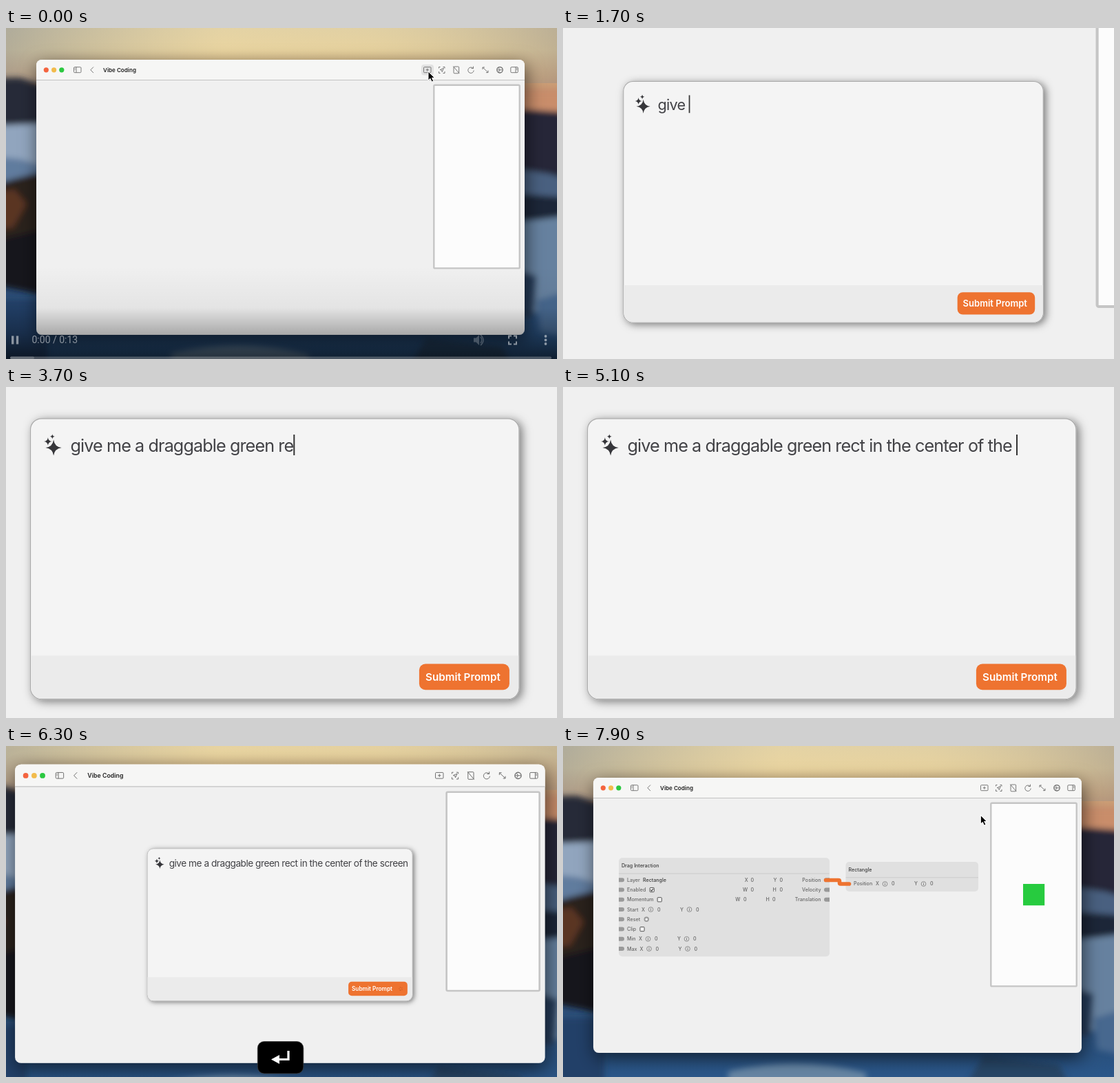
Animation of 800x480 px, one loop 8 s. Source, as an HTML page:

```html
<!DOCTYPE html>
<html lang="en">
<head>
<meta charset="utf-8">
<title>Prompt to nodes</title>
<style>
  html, body { margin: 0; width: 100%; height: 100%; overflow: hidden; background: #f0f0f0; }
  svg { display: block; width: 100vw; height: 100vh; }
  text { font-family: Inter, sans-serif; white-space: pre; }
  .icon { fill: none; stroke: #6c6c6c; stroke-width: .9; }
  .title { font-size: 8.1px; font-weight: 600; fill: #222; }
  .big { font-size: 12.6px; letter-spacing: -.45px; fill: #424246; }
  .list { font-size: 7.6px; letter-spacing: -.12px; fill: #606060; }
  .doc { font-size: 7.2px; letter-spacing: -.12px; fill: #3c3c3c; }
  .button { font-size: 7.6px; font-weight: 600; fill: #fff; }
  .node { font-size: 7.1px; font-weight: 500; fill: #666; }
  .dark { fill: #3a3a3a; }
  .end { text-anchor: end; }
</style>
</head>
<body>
<svg viewBox="0 0 800 480">
  <defs>
    <linearGradient id="sky" x2="0" y2="1">
      <stop stop-color="#d5c9a6"/><stop offset=".1" stop-color="#e2cd9b"/>
      <stop offset=".17" stop-color="#d3aa7c"/><stop offset=".25" stop-color="#b87f66"/>
      <stop offset=".3" stop-color="#39435a"/><stop offset=".9" stop-color="#29517f"/>
      <stop offset="1" stop-color="#2b5a90"/>
    </linearGradient>
    <linearGradient id="vignette">
      <stop stop-color="#7b8592" stop-opacity=".5"/><stop offset=".4" stop-color="#fbe6ac" stop-opacity=".3"/>
      <stop offset=".65" stop-color="#fbe6ac" stop-opacity=".2"/><stop offset="1" stop-color="#8c8583" stop-opacity=".45"/>
    </linearGradient>
    <linearGradient id="shade" x2="0" y2="1">
      <stop stop-opacity="0"/><stop offset=".45" stop-opacity=".05"/>
      <stop offset=".72" stop-opacity=".28"/><stop offset="1" stop-opacity=".65"/>
    </linearGradient>
    <filter id="soft" x="-20%" y="-20%" width="140%" height="140%"><feGaussianBlur stdDeviation="4"/></filter>
    <filter id="windowShadow" x="-10%" y="-10%" width="120%" height="130%">
      <feDropShadow dy="7" stdDeviation="13" flood-opacity=".6"/>
    </filter>
    <filter id="panelShadow" x="-10%" y="-10%" width="120%" height="125%">
      <feDropShadow dy="1.5" stdDeviation="3.5" flood-opacity=".5"/>
    </filter>
    <filter id="motion" filterUnits="userSpaceOnUse" x="-20" y="-20" width="840" height="520">
      <feGaussianBlur id="motionBlur" stdDeviation="0"/>
    </filter>
  </defs>

  <g id="camera">
    <rect x="-20" y="-20" width="840" height="520" fill="url(#sky)"/>
    <rect x="-20" y="-20" width="840" height="100" fill="url(#vignette)"/>
    <g filter="url(#soft)">
      <path d="M-20 73L20 72 70 88V150H-20Z" fill="#262b38"/>
      <path d="M-20 142L60 138V222H-20Z" fill="#91a5be"/>
      <path d="M-20 186L20 190 60 202V222H-20Z" fill="#607b9e"/>
      <path d="M-20 228L14 218 60 207V382L-20 372Z" fill="#2c211f"/>
      <path d="M-20 240L12 234 30 255 10 290H-20Z" fill="#5a3421"/>
      <path d="M-20 310L60 290V388L-20 372Z" fill="#12161f"/>
      <path d="M740 91H820V122L740 116Z" fill="#c98d6b"/>
      <path d="M740 118L820 123V225H740Z" fill="#252838"/>
      <path d="M740 204L790 212 820 222V250H740Z" fill="#4a6180"/>
      <path d="M740 240L820 246V278H740Z" fill="#1c2537"/>
      <path d="M740 282L820 272V400L740 420Z" fill="#66819f"/>
      <path d="M740 350L770 360 765 420H740Z" fill="#273d5c"/>
      <path d="M770 395L820 380V450L775 440Z" fill="#46678f"/>
      <path d="M-20 395H60V500H-20Z" fill="#203f68"/>
      <path d="M240 472Q340 448 440 474V500H240Z" fill="#6685a3"/>
      <path d="M610 450L720 462 740 500H580Z" fill="#274465"/>
    </g>
    <rect x="44" y="46" width="709" height="399" rx="8" fill="#f0f0f0" filter="url(#windowShadow)"/>
    <path d="M44 75.5V54a8 8 0 0 1 8-8H745a8 8 0 0 1 8 8V75.5Z" fill="#f6f6f5"/>
    <path d="M44 75.5H753" stroke="#c3c3c3"/>
    <circle cx="58.3" cy="60.8" r="3.6" fill="#f4643f"/>
    <circle cx="69.6" cy="60.8" r="3.6" fill="#f2bb4c"/>
    <circle cx="80.8" cy="60.8" r="3.6" fill="#2bc840"/>
    <text class="title" x="141" y="63.8">Vibe Coding</text>
    <rect id="hover" x="603" y="53" width="18" height="15.5" rx="4" fill="#e2e2e2"/>
    <g class="icon">
      <rect x="98.5" y="56.7" width="10.5" height="8" rx="1.3"/><path d="M102 56.7v8M99.7 58.7h1M99.7 60.3h1M127 56.5l-4.2 4.3 4.2 4.3"/>
      <rect x="606.5" y="56.7" width="10.5" height="8" rx="1"/><path d="M611.8 58.7v4M609.8 60.7h4"/>
      <path d="M628.5 58.5v-2h2M634.5 56.5h2.5v2M637 63v2.5h-2.5M630.5 65.5h-2v-2.5M635.5 58.3l-5.3 2.3 2.4 .6 .6 2.4Z"/>
      <rect x="650" y="56" width="7.6" height="9.8" rx="1"/><path d="M649.3 55.5l9 10.6"/>
      <path d="M678.3 58.6A4.2 4.2 0 1 0 679.2 61.5M675.5 58.6h3v-3"/>
      <path d="M692 60v-3h3M692 57l8 7.5M697 64.6h3v-3"/>
      <circle cx="717" cy="60.8" r="4.2" stroke-width="1.3"/><path d="M713.5 60.8h7M717 60.8l-2-3.3M717 60.8l-2 3.3"/>
      <rect x="732.8" y="56.7" width="10.5" height="8" rx="1.3"/><path d="M740 56.7v8M741 58.7h1.3M741 60.3h1.3"/>
    </g>
    <rect x="621.3" y="82.8" width="124.4" height="265.6" rx="1.5" fill="#fcfcfc" stroke="#c5c5c5" stroke-width="2.4"/>

    <g id="nodes"></g>

    <g id="panel">
      <rect x="221" y="158.4" width="354.7" height="203.4" rx="8" fill="#f4f4f4" stroke="#a9a9a9" stroke-width=".6" filter="url(#panelShadow)"/>
      <path d="M221.3 330.3H575.4V353.5a8 8 0 0 1-8 8H229.3a8 8 0 0 1-8-8Z" fill="#ebebeb"/>
      <g id="search">
        <g fill="none" stroke="#333" stroke-width="1.2"><circle cx="236.3" cy="176.7" r="4.8"/><path d="M239.8 180.2l4 4"/></g>
        <text class="big" x="250" y="182.5" style="fill:#b5b5b5">Search or enter AI prompt...</text>
        <rect x="226" y="196.5" width="90" height="14" rx="4" fill="#ee7330"/>
        <clipPath id="listClip"><rect x="221" y="190" width="355" height="140"/></clipPath>
        <g id="lists" clip-path="url(#listClip)"></g>
        <rect x="522" y="336.3" width="47" height="18.8" rx="4.5" fill="#ee7330"/>
        <text class="button" x="527" y="348.5">Add Node</text>
      </g>
      <g id="prompt">
        <path id="sparkle" fill="#36363a"/>
        <text id="typed" class="big" x="250" y="182.4"></text>
        <rect id="caret" y="170" width="1" height="15" fill="#333"/>
        <rect id="submit" y="336.3" height="18.8" rx="4.5" fill="#ee7330"/>
        <text id="submitLabel" class="button" y="348.5">Submit Prompt</text>
        <circle id="spinner" cx="560" cy="345.8" r="2" fill="none" stroke="#c65a24" stroke-width="1.2" stroke-dasharray=".8 1.3"/>
      </g>
    </g>
    <path id="cursor" d="M0 0V13L3 10.3 5.1 15 7.6 13.9 5.5 9.3H9.4Z" stroke="#fff" stroke-width="1"/>
  </g>

  <g id="keycap">
    <rect x="365.3" y="428.5" width="66.5" height="46.5" rx="9.5" stroke="#3c3c3c" stroke-width=".8"/>
    <path d="M410 442V454.5H394" fill="none" stroke="#fff" stroke-width="3.2"/>
    <path d="M385 454.5L397 448V461Z" fill="#fff"/>
  </g>

  <g id="controls">
    <rect y="345" width="800" height="135" fill="url(#shade)"/>
    <g opacity=".5" fill="#fff">
      <path d="M8 446.5h3.4v12H8ZM14.8 446.5h3.4v12h-3.4Z"/>
      <text x="37.5" y="457.3" style="font:14px Roboto,sans-serif">0:00 / 0:13</text>
      <path d="M679 449.5h3.5l4.5-4.5v15l-4.5-4.5H679Z" opacity=".45"/>
      <path d="M689 448q3.5 4.500 0 9M689 444.800q8 7.700 0 15.400" fill="none" stroke="#fff" stroke-width="1.6" opacity=".45"/>
      <path d="M730 450.500v-4h4M737 446.500h4v4M741 454.500v4h-4M734 458.500h-4v-4" fill="none" stroke="#fff" stroke-width="2"/>
      <circle cx="783.5" cy="447" r="1.9"/><circle cx="783.5" cy="452.500" r="1.9"/><circle cx="783.5" cy="458" r="1.9"/>
      <rect x="6" y="476.500" width="786" height="3.500" rx="1.700" opacity=".5"/>
      <rect x="6" y="476.500" width="35" height="3.500" rx="1.700" opacity=".5"/>
    </g>
  </g>
</svg>

<script>
const $ = id => document.getElementById(id);
const set = (id, attrs) => { for (const k in attrs) $(id).setAttribute(k, attrs[k]); };
const show = (id, amount) => {
  $(id).style.display = amount > 0 ? '' : 'none';
  $(id).style.opacity = amount;
};
const clamp = x => Math.min(1, Math.max(0, x));
const ramp = (t, from, to) => clamp((t - from) / (to - from));
const smooth = x => x * x * (3 - 2 * x);
const label = (cls, x, y, s) => `<text class="${cls}" x="${x}" y="${y}">${s}</text>`;

// Search lists
const kinds = ['Text', 'Oval', 'Rectangle', 'Image', 'Video', '3D Model', 'Reality View', 'Shape', 'Color Fill', 'Hit Area'];
const inputs = ['Text value (a string)', 'Color', 'Position (X/Y)', 'Rotation X', 'Rotation Y', 'Rotation Z',
  'Size (Width / Height)', 'Opacity', 'Scale', 'Anchoring'];
$('lists').innerHTML =
  kinds.map((s, i) => label('list', 230, 206.2 + i * 13.85, s)).join('') +
  label('doc', 323, 203.8, 'Text') +
  label('doc', 323, 221.4, 'Displays a text value in the preview window.') +
  `<g font-style="italic">${label('doc', 323, 239.4, 'Inputs')}</g>` +
  inputs.map((s, i) => label('doc', 323, 248.2 + i * 8.85, '• ' + s)).join('');

// Node graph
const row = i => 194.3 + i * 14.25;
const word = (x, y, s, cls = '') => label('node ' + cls, x, y + 2.5, s);
const inPort = (x, y) => `<path d="M${x} ${y - 3}h5a3 3 0 0 1 0 6h-5Z" fill="#999"/>`;
const outPort = y => `<path d="M387 ${y - 3}h-5a3 3 0 0 0 0 6h5Z" fill="#999"/>`;
const info = (x, y) => `<circle class="icon" cx="${x}" cy="${y}" r="3.4" style="stroke-width:.7"/>` +
  `<path d="M${x} ${y - 1.8}v.8M${x} ${y - .4}v2.2" stroke="#555" stroke-width=".8"/>`;
const box = (x, y) => `<rect x="${x - 3.1}" y="${y - 3.1}" width="6.2" height="6.2" rx=".8" fill="#f3f3f3" stroke="#444" stroke-width=".9"/>`;
const field = (x, y, name) => word(x, y, name) + info(x + 13.5, y) + word(x + 23, y, '0');
const card = (x, y, w, h, name) =>
  `<rect x="${x}" y="${y}" width="${w}" height="${h}" rx="5" fill="#e0e0e0"/>` +
  `<path d="M${x} ${y + 22.8}h${w}" stroke="#c6c6c6" stroke-width=".8"/>` + word(x + 4, y + 11.3, name, 'dark');
const pair = (i, a, ax, b, bx, n1, n2) =>
  word(ax, row(i), a) + word(n1, row(i), '0') + word(bx, row(i), b) + word(n2, row(i), '0');

$('nodes').innerHTML =
  card(81, 162.2, 306, 143, 'Drag Interaction') +
  ['Layer', 'Enabled', 'Momentum', 'Start', 'Reset', 'Clip', 'Min', 'Max']
    .map((s, i) => inPort(81, row(i)) + word(93, row(i), s)).join('') +
  ['Position', 'Velocity', 'Translation'].map((s, i) => outPort(row(i)) + word(374.5, row(i), s, 'end')).join('') +
  word(116, row(0), 'Rectangle', 'dark') +
  pair(0, 'X', 263.7, 'Y', 305.5, 272.5, 314.5) +
  pair(1, 'W', 261, 'H', 304.5, 272.5, 314.5) +
  pair(2, 'W', 250.3, 'H', 294.5, 262, 304) +
  box(129.2, row(1)) + `<path d="M127.4 ${row(1)}l1.4 1.6 2.4-3.4" fill="none" stroke="#333"/>` +
  box(140.2, row(2)) + box(115, row(5)) +
  `<circle cx="121.2" cy="${row(4)}" r="2.8" fill="#eee" stroke="#999" stroke-width="1.8"/>` +
  [[3, 114], [6, 110], [7, 111.5]].map(([i, x]) => field(x, row(i), 'X') + field(x + 56, row(i), 'Y')).join('') +
  card(410.5, 168, 192.5, 43, 'Rectangle') +
  word(422, 200, 'Position') + field(454, 200, 'X') + field(510, 200, 'Y') +
  '<path d="M381.500 194.500H400q1.500 0 1.500 1.500v2.500q0 1.500 1.500 1.500h12.500" fill="none" stroke="#ee7330" stroke-width="5.600" stroke-linecap="round"/>' +
  '<rect x="668" y="200" width="31.2" height="31.2" fill="#27cb3f"/>';

const star = (x, y, r) => `M${x} ${y - r}Q${x + r * .12} ${y - r * .12} ${x + r} ${y}Q${x + r * .12} ${y + r * .12} ${x} ${y + r}` +
  `Q${x - r * .12} ${y + r * .12} ${x - r} ${y}Q${x - r * .12} ${y - r * .12} ${x} ${y - r}Z`;
set('sparkle', { d: star(237.8, 179.5, 5.8) + star(233.7, 175, 2.9) + star(236.9, 171.4, 1.8) });

// Timeline, in ms
const LOOP = 8000, OPEN = 480, ZOOM_IN = 1350, ZOOM_OUT = 5733, ENTER = 5600, CLOSE = 7050;
const PROMPT = 'give me a draggable green rect in the center of the screen';
const typing = [[1200, 0], [2100, 10.3], [2700, 16.5], [3700, 28.3], [5450, 58]];
const OMEGA = .0072;   // critically damped camera spring

const spring = t => t < 0 ? 0 : 1 - (1 + OMEGA * t) * Math.exp(-OMEGA * t);
const speed = t => t < 0 ? 0 : 1000 * OMEGA * OMEGA * t * Math.exp(-OMEGA * t);

function typedCount(t) {
  let n = 0;
  for (let i = 1; i < typing.length; i++) {
    const [t0, n0] = typing[i - 1], [t1, n1] = typing[i];
    n += (n1 - n0) * ramp(t, t0, t1);
  }
  return Math.floor(n + 1e-6);
}

function render(t) {
  const zoom = 1 + spring(t - ZOOM_IN) - spring(t - ZOOM_OUT);
  const blur = .22 * Math.abs(speed(t - ZOOM_IN) - speed(t - ZOOM_OUT));
  set('camera', {
    transform: `translate(406.5 271) scale(${zoom}) translate(-406.5 -271)`,
    filter: blur > .08 ? 'url(#motion)' : 'none'
  });
  set('motionBlur', { stdDeviation: blur });

  show('controls', 1 - ramp(t, 60, 320));
  show('hover', t < 560 ? 1 : 0);
  show('panel', ramp(t, OPEN, OPEN + 120) * (1 - ramp(t, CLOSE, CLOSE + 100)));
  show('nodes', ramp(t, CLOSE + 50, CLOSE + 150));

  const count = typedCount(t), sent = t >= ENTER;
  show('search', count ? 0 : 1);
  show('prompt', count ? 1 : 0);
  $('typed').textContent = PROMPT.slice(0, count);
  if (count) set('caret', { x: 250 + $('typed').getComputedTextLength() });
  show('caret', sent ? 0 : 1);
  set('submit', { x: sent ? 490 : 503.2, width: sent ? 79 : 65.5 });
  set('submitLabel', { x: sent ? 494.5 : 507.8 });
  show('spinner', sent ? 1 : 0);
  set('spinner', { transform: `rotate(${t * .36 % 360} 560 345.8)` });

  const away = smooth(ramp(t, 500, 980)), back = smooth(ramp(t, 7400, 7950));
  set('cursor', { transform: `translate(${613 - 35 * away + 29 * back} ${63 + 47.500 * away - 10.500 * back})` });
  show('cursor', t < 1200 || t > 7300 ? 1 : 0);

  const pop = ramp(t, ENTER, ENTER + 150), size = .8 + .2 * smooth(pop);
  set('keycap', { transform: `translate(398.5 452) scale(${size}) translate(-398.5 -452)` });
  show('keycap', pop * (1 - ramp(t, 7000, 7200)));
}

function tick() {
  render(performance.now() % LOOP);
  requestAnimationFrame(tick);
}
tick();
</script>
</body>
</html>
```
